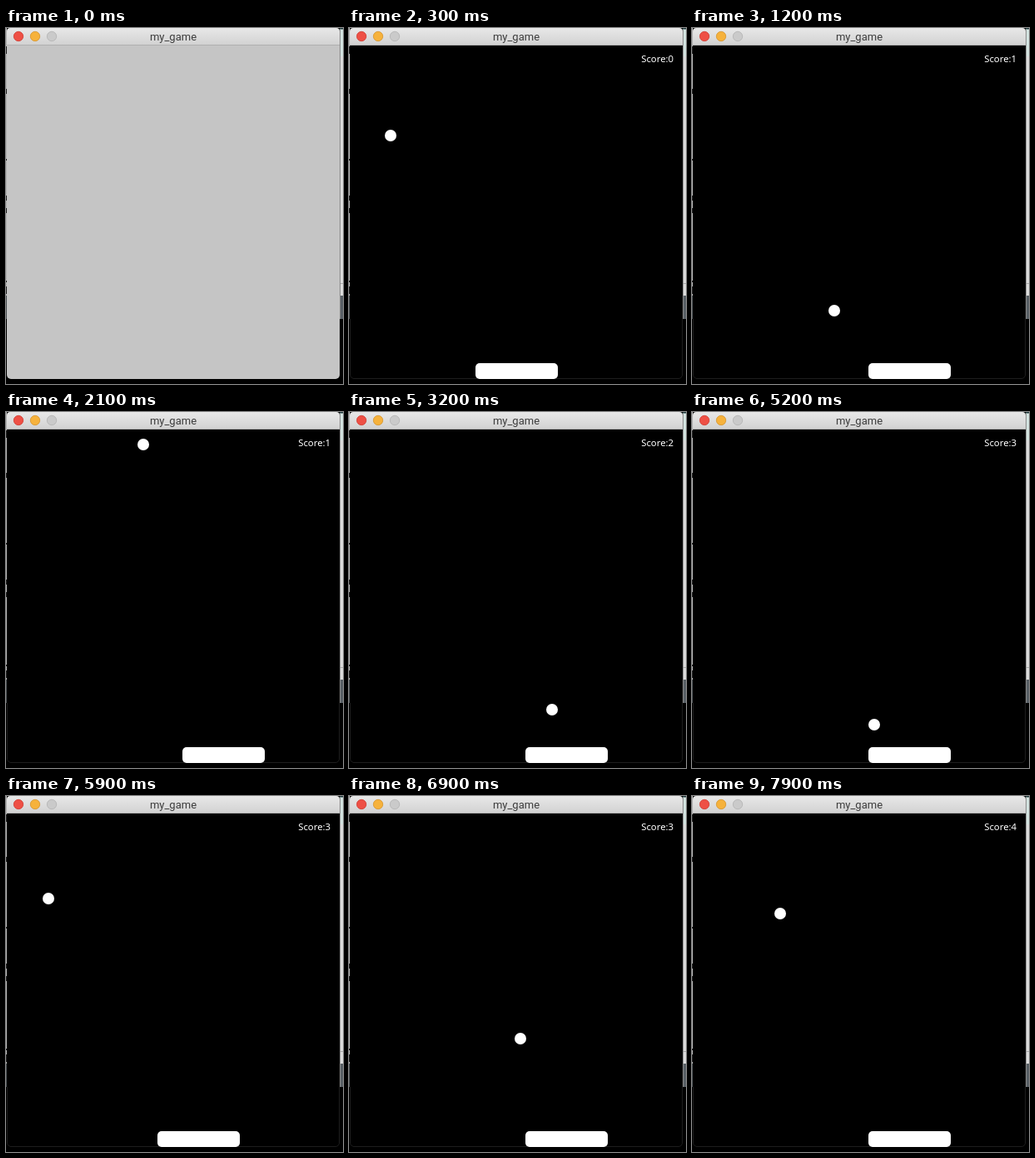
These frames come from a looping animation (405x427 px, 8 s). An HTML page:

```html
<!DOCTYPE html>
<html>
<head>
<meta charset="utf-8">
<style>
  html, body { margin: 0; width: 100%; height: 100%; overflow: hidden; background: #000; }
  svg { display: block; width: 405px; height: 427px; }
  .title { font: 13px Roboto, sans-serif; fill: #3c3c3c; }
  .score { font: 11.3px "Noto Sans", sans-serif; fill: #fff; }
</style>
</head>
<body>
<svg viewBox="0 0 405 427">
  <defs>
    <linearGradient id="bar" x2="0" y2="1">
      <stop stop-color="#e8e8e8"/>
      <stop offset="1" stop-color="#d1d1d1"/>
    </linearGradient>
  </defs>

  <!-- desktop behind the window -->
  <rect width="1" height="321" fill="#b4b4b4"/>
  <rect y="321" width="1" height="28" fill="#4c5256"/>
  <path d="M0 22v9M0 73v6M0 157v2M0 201v6M0 216v6M0 303v2M0 310v9" stroke="#222" stroke-width="2"/>
  <rect x="401" width="4" height="321" fill="#dcdcdc"/>
  <rect x="401" width="4" height="34" fill="#d3e3e0"/>
  <rect x="401" width="4" height="1.5" fill="#1c3538"/>
  <rect x="401" y="306" width="4" height="1" fill="#aaa"/>
  <rect x="401" y="321" width="4" height="28" fill="#596066"/>
  <rect x="401" y="2" width="1" height="347" fill="#8a8a8a"/>

  <!-- window -->
  <path id="pane" d="M1 20H401V416a5 5 0 0 1-5 5H6a5 5 0 0 1-5-5Z" fill="#c5c5c5"/>
  <path id="edge" d="M1.5 349V416a4.500 4.500 0 0 0 4.500 4.500H396a4.500 4.500 0 0 0 4.500-4.500V349" fill="none" stroke="#1d1d1d"/>
  <path d="M1 21V4a4 4 0 0 1 4-4H397a4 4 0 0 1 4 4V21Z" fill="url(#bar)"/>
  <rect x="1" y="20" width="400" height="1" fill="#b0b0b0"/>
  <g stroke-width=".8">
    <circle cx="15" cy="10" r="5.700" fill="#ee5045" stroke="#d0392f"/>
    <circle cx="35" cy="10" r="5.700" fill="#f6b23c" stroke="#d6942a"/>
    <circle cx="55" cy="10" r="5.700" fill="#cacaca" stroke="#b3b3b3"/>
  </g>
  <text class="title" x="201" y="15" text-anchor="middle">my_game</text>

  <g id="game" fill="#fff">
    <text id="score" class="score" x="390" y="41" text-anchor="end"></text>
    <circle id="ball" r="7"/>
    <rect id="paddle" y="402" width="99" height="19" rx="5"/>
  </g>
</svg>
<script>
const LOOP = 8000, TICK = 100, START = 300;
const el = id => document.getElementById(id);
const hits = [1100, 3100, 5200, 7200];
const moves = [[0, 152], [700, 182], [800, 212], [2700, 242], [3000, 212], [5800, 182], [6800, 212]];

const offLeft = (x, wall) => wall + Math.abs(x - wall);
const offRight = (x, wall) => wall - Math.abs(wall - x);

// each paddle hit starts a new horizontal run
const runs = [
  t => 50 + .24 * (t - 300),
  t => offRight(offLeft(165 + .36 * (t - 2100), 6), 396),
  t => offLeft(244 - .24 * (t - 3200), 6),
  t => offLeft(51 - .24 * (t - 5900), 8.5),
  t => 106 - .24 * (t - 7900)
];

// steady bounce between the ceiling and the paddle
function ballY(t) {
  const span = 369, u = (102 + .36 * (t - START)) % (2 * span);
  return 27 + (u < span ? u : 2 * span - u);
}

function draw(now) {
  const t = Math.floor(now % LOOP / TICK) * TICK;
  const on = t >= START;
  el('pane').setAttribute('fill', on ? '#000' : '#c5c5c5');
  el('game').style.display = el('edge').style.display = on ? '' : 'none';
  if (on) {
    const score = hits.filter(h => t >= h).length;
    el('score').textContent = 'Score:' + score;
    el('ball').setAttribute('cx', runs[score](t));
    el('ball').setAttribute('cy', ballY(t));
    el('paddle').setAttribute('x', moves.filter(m => t >= m[0]).pop()[1]);
  }
  requestAnimationFrame(() => draw(performance.now() - start));
}

const start = performance.now();
draw(0);
</script>
</body>
</html>
```
